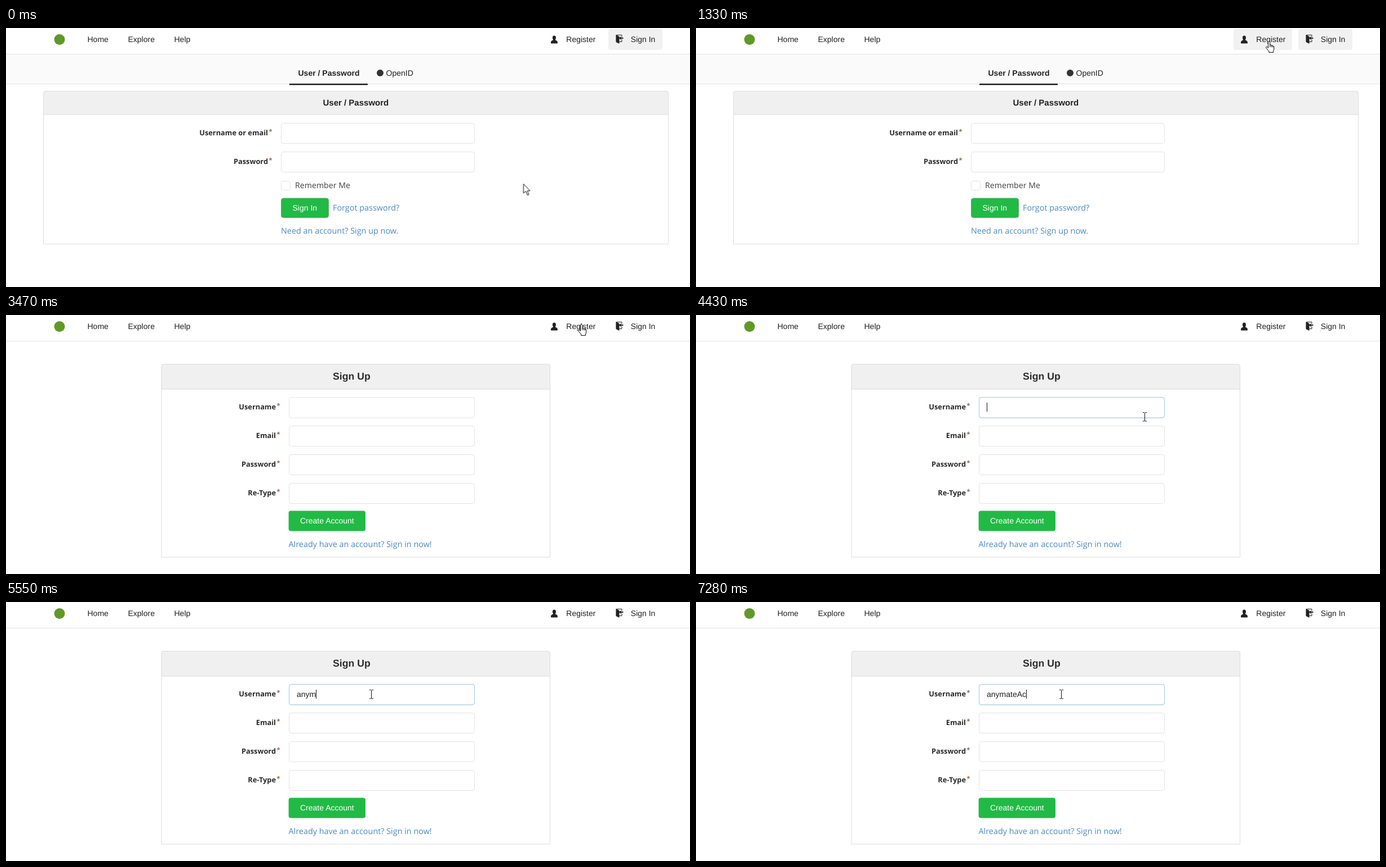
Animation, 1214 px wide and 461 px high, one loop 8000 ms. Source, as an HTML page:

```html
<!DOCTYPE html>
<html lang="en">
<head>
<meta charset="utf-8">
<title>Account sign up</title>
<style>
html, body { margin: 0; width: 100%; height: 100%; overflow: hidden; background: #fff; }
svg { display: block; width: 1214px; height: 461px; }
text { font: 14px "Liberation Sans", Arial, sans-serif; fill: #212121; white-space: pre; text-rendering: geometricPrecision; }
.b { font-weight: 700; }
.h1 { font-size: 15px; font-weight: 700; }
.h2 { font-size: 17.7px; font-weight: 700; fill: #2b2d2f; }
.label { font: 700 12.8px "Open Sans", "Noto Sans", sans-serif; text-anchor: end; fill: #2a2a2a; }
.star { font: 700 11px "Open Sans", "Noto Sans", sans-serif; fill: #a5602f; }
.body { font: 14.4px "Open Sans", "Noto Sans", sans-serif; fill: #404040; }
.link { fill: #4a89c4; }
.on-green { fill: #fff; }
.pill { fill: #f1f1f1; }
.field { fill: #fff; stroke: #e2e2e2; }
.focus { fill: none; stroke: #a0c8e2; }
.panel { fill: #fff; stroke: #dcdcdd; }
.head { fill: #f0f0f0; stroke: #dcdcdd; }
.line { fill: #e2e2e2; }
.green { fill: #21ba45; }
.cursor { fill: #fff; stroke: #000; stroke-linejoin: round; }

.login, .signup, .hover, .focused, .arrow, .hand, .beam, .caret { animation: 8s step-end infinite; }
.login { animation-name: login; }
.signup { animation-name: signup; }
.hover { animation-name: hover; }
.focused { animation-name: focused; }
.arrow { animation-name: arrow; }
.hand { animation-name: hand; }
.beam { animation-name: beam; }
.caret { animation-name: type; }

@keyframes login { 0% { opacity: 1 } 43.375%, 100% { opacity: 0 } }
@keyframes signup { 0% { opacity: 0 } 43.375%, 100% { opacity: 1 } }
@keyframes hover { 0% { opacity: 0 } 16.625%, 100% { opacity: 1 } }
@keyframes focused { 0% { opacity: 0 } 55.375%, 100% { opacity: 1 } }
@keyframes arrow {
  0% { opacity: 1; transform: translate(918.5px, 277.5px) }
  8.875% { opacity: 1; transform: translate(976.5px, 115.5px) }
  16.625%, 100% { opacity: 0; transform: translate(976.5px, 115.5px) }
}
@keyframes hand {
  0% { opacity: 0; transform: translate(1011px, 23px) }
  16.625% { opacity: 1; transform: translate(1011px, 23px) }
  27.625% { opacity: 1; transform: translate(1015px, 16px) }
  55.375%, 100% { opacity: 0; transform: translate(1015px, 16px) }
}
@keyframes beam {
  0% { opacity: 0; transform: translate(796px, 181px) }
  55.375% { opacity: 1; transform: translate(796px, 181px) }
  61.375%, 100% { opacity: 1; transform: translate(648px, 164px) }
}
@keyframes type {
  0% { transform: translateX(0) }
  61.375% { transform: translateX(15px) }
  65.125% { transform: translateX(22px) }
  69.375% { transform: translateX(34px) }
  78.625% { transform: translateX(45px) }
  83.5% { transform: translateX(63px) }
  91%, 100% { transform: translateX(70px) }
}
</style>
</head>
<body>
<svg viewBox="0 0 1214 461">
  <rect width="1214" height="461" fill="#fff"/>

  <g class="login">
    <rect class="pill" x="1069" y="2" width="96" height="37" rx="4"/>
    <rect class="pill hover" x="954" y="2" width="104" height="37" rx="4"/>
    <rect y="47" width="1214" height="52" fill="#fafafa"/>
    <rect class="line" y="99" width="1214" height="1"/>
    <rect x="503" y="99" width="139" height="2.5" fill="#1b1c1d"/>
    <text class="b" x="518.5" y="84.5">User / Password</text>
    <circle cx="664" cy="80" r="6" fill="#333"/>
    <text x="674.5" y="84.5">OpenID</text>

    <path class="panel" d="M66.5 384.5V116.5q0-4 4-4H1171.5q4 0 4 4V384.5Z"/>
    <path class="head" d="M66.5 154V116.5q0-4 4-4H1171.5q4 0 4 4V154Z"/>
    <text class="h1" x="562.5" y="137.5">User / Password</text>

    <text class="label" x="465" y="190.5">Username or email</text>
    <text class="star" x="466.5" y="188">*</text>
    <rect class="field" x="488.5" y="169.5" width="343" height="36" rx="4"/>
    <text class="label" x="465" y="241.5">Password</text>
    <text class="star" x="466.5" y="239">*</text>
    <rect class="field" x="488.5" y="220.5" width="343" height="36" rx="4"/>
    <rect class="field" x="488.5" y="272.5" width="16" height="16" rx="3"/>
    <text class="body" x="513" y="284.5" style="font-size:14.2px">Remember Me</text>
    <rect class="green" x="488.5" y="303" width="84" height="34.5" rx="4" stroke="#5da66c"/>
    <text class="on-green" x="508.5" y="325">Sign In</text>
    <text class="body link" x="580" y="325">Forgot password?</text>
    <text class="body link" x="488" y="366">Need an account? Sign up now.</text>
  </g>

  <g class="signup">
    <path class="panel" d="M276 431V91.5q0-4 4-4H961.5q4 0 4 4V431Z"/>
    <path class="head" d="M276 132V91.5q0-4 4-4H961.5q4 0 4 4V132Z"/>
    <text class="h2" x="580" y="115">Sign Up</text>

    <text class="label" x="479" y="167.5">Username</text>
    <text class="star" x="480.5" y="165">*</text>
    <rect class="field" x="502.5" y="146.5" width="329" height="36.5" rx="4"/>
    <text class="label" x="479" y="218.5">Email</text>
    <text class="star" x="480.5" y="216">*</text>
    <rect class="field" x="502.5" y="197.5" width="329" height="36" rx="4"/>
    <text class="label" x="479" y="269.5">Password</text>
    <text class="star" x="480.5" y="267">*</text>
    <rect class="field" x="502.5" y="248.5" width="329" height="36" rx="4"/>
    <text class="label" x="479" y="320.5">Re-Type</text>
    <text class="star" x="480.5" y="318">*</text>
    <rect class="field" x="502.5" y="299.5" width="329" height="36" rx="4"/>

    <rect class="green" x="501.6" y="348.6" width="136.4" height="35.8" rx="4"/>
    <text class="on-green" x="522" y="371">Create Account</text>
    <text class="body link" x="501.5" y="412.5">Already have an account? Sign in now!</text>

    <!-- a white cover behind the caret hides what is not typed yet -->
    <g class="focused">
      <rect class="focus" x="502.5" y="146.5" width="329" height="36.5" rx="4"/>
      <text x="516" y="168.5">anymateAc</text>
      <g class="caret">
        <rect x="516" y="154" width="80" height="22" fill="#fff"/>
        <rect x="516" y="156" width="1" height="16" fill="#111"/>
      </g>
    </g>
  </g>

  <rect class="line" y="46" width="1214" height="1"/>
  <circle cx="95" cy="20.5" r="9.5" fill="#609926"/>
  <text x="144.5" y="25">Home</text>
  <text x="216.5" y="25">Explore</text>
  <text x="298.5" y="25">Help</text>
  <path fill="#212121" transform="translate(967 12.5)" d="M12 14a1 1 0 0 1-1 1H1a1 1 0 0 1-1-1v-1c0-2.6 4-4 4-4s.2-.4 0-1C3.2 7.4 3.1 6.4 3 4c.2-2.4 1.9-3 3-3s2.8.6 3 3c-.1 2.4-.2 3.4-1 4-.2.6 0 1 0 1s4 1.4 4 4z"/>
  <text x="994.3" y="25">Register</text>
  <path fill="#212121" transform="translate(1081.5 12)" d="M7 6.75V12h4V8h1v4q0 1-1 1H7v3l-5.45-2.72Q1 13 1 12.37V1q0-1 1-1h9q1 0 1 1v3h-1V1H3l4 2v2.25L10 3v2h4v2h-4v2z"/>
  <text x="1108.8" y="25">Sign In</text>

  <path class="cursor arrow" d="M0 0V16.5L4 13L7 20L9.5 19L6.700 12.3H11.5Z"/>
  <g class="hand">
    <path class="cursor" d="M4.6 12.5V2.2q0-1.6 1.6-1.6t1.6 1.6V7q2.4-.4 2.6 1 2.2-.4 2.4 1 2-.2 2 1.7v4.3q0 1.5-1.2 3v2.4H5.8V18.3L1.2 12.7Q.2 10.9 1.4 10.2q1.2-.5 3.2 2.3"/>
    <path d="M7.8 7v4M10.4 8v3.2M12.8 9v2.6" stroke="#000" fill="none"/>
  </g>
  <path class="beam" d="M-3 -7.5h2.5l1 1 1-1H4M.5-7V7.5M-3 8h2.5l1-1 1 1H4" stroke="#111" fill="none"/>
</svg>
</body>
</html>
```
